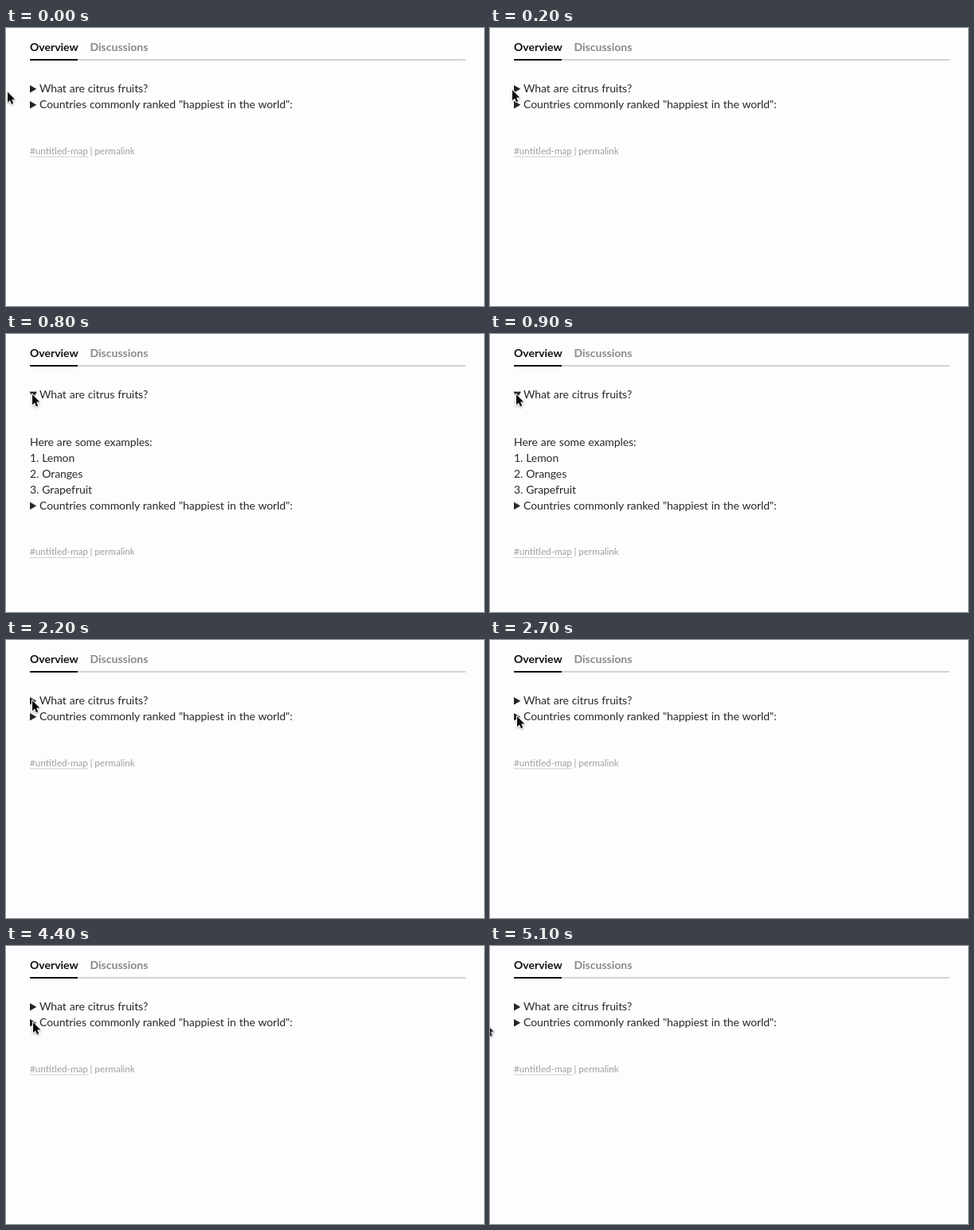
These frames come from a looping animation (600 px wide and 350 px high, 5.2 s). An HTML page:

```html
<!DOCTYPE html>
<html lang="en">
<head>
<meta charset="utf-8">
<title>Collapsible notes</title>
<style>
  html, body { margin: 0; width: 100%; height: 100%; overflow: hidden; background: #fdfcfe; }
  svg { display: block; width: 600px; height: 350px; }
  text { font: 400 14px Lato, "Open Sans", sans-serif; fill: #29282a; word-spacing: .5px; letter-spacing: -.08px; }
  .tab { font-weight: 700; letter-spacing: 0; fill: #111012; }
  .tab.idle { fill: #89888a; }
  .foot text { font-size: 11.7px; letter-spacing: 0; fill: #a09fa1; }
  .mark { fill: #252426; transform-box: view-box; }
  #mark1 { transform-origin: 34.2px 76.8px; }
  #mark2 { transform-origin: 34.2px 96.8px; }

  .step { animation: 5200ms step-end infinite; }
  #list1 { animation-name: show1; }
  #list2 { animation-name: show2; }
  #mark1 { animation-name: turn1; }
  #mark2 { animation-name: turn2; }
  #second { animation-name: push1; }
  #foot { animation-name: push2; }
  #cursor { animation-name: point; filter: drop-shadow(0 1px 1px rgba(0, 0, 0, .3)); }

  /* first item open 800-2200 ms, second item open 3200-4400 ms */
  @keyframes show1 { 0%, 42.3% { visibility: hidden; } 15.38% { visibility: visible; } 100% { visibility: hidden; } }
  @keyframes show2 { 0%, 84.61% { visibility: hidden; } 61.53% { visibility: visible; } 100% { visibility: hidden; } }
  @keyframes turn1 { 0%, 42.3%, 100% { transform: rotate(0deg); } 15.38% { transform: rotate(90deg); } }
  @keyframes turn2 { 0%, 84.61%, 100% { transform: rotate(0deg); } 61.53% { transform: rotate(90deg); } }
  @keyframes push1 { 0%, 42.3%, 100% { transform: translateY(0); } 15.38% { transform: translateY(119.6px); } }
  @keyframes push2 {
    0%, 42.3%, 84.61%, 100% { transform: translateY(0); }
    15.38% { transform: translateY(119.6px); }
    61.53% { transform: translateY(99.7px); }
  }
  @keyframes point {
    0% { transform: translate(2px, 80.5px); }
    1.92% { transform: translate(14px, 79px); }
    3.84% { transform: translate(28px, 78px); }
    5.76% { transform: translate(33px, 77.5px); }
    9.61% { transform: translate(33px, 76.5px); }
    11.53% { transform: translate(33px, 76px); }
    46.15% { transform: translate(33px, 79px); }
    48.07% { transform: translate(33.4px, 87px); }
    50% { transform: translate(34px, 94px); }
    51.92% { transform: translate(34px, 96px); }
    94.23% { transform: translate(25px, 97px); }
    96.15% { transform: translate(8px, 98px); }
    98.07%, 100% { transform: translate(-4.5px, 98.5px); }
  }
</style>
</head>
<body>
<svg viewBox="0 0 600 350">
  <text class="tab" x="30" y="28.5">Overview</text>
  <text class="tab idle" x="105.5" y="28.5">Discussions</text>
  <rect x="30" y="39" width="547" height="2" fill="#d3d2d4"/>
  <rect x="30" y="39" width="60" height="2" fill="#0d0c0e"/>

  <path id="mark1" class="mark step" d="M30 72.1 L38.3 76.8 L30 81.5Z"/>
  <text x="42" y="81.4">What are citrus fruits?</text>
  <g id="list1" class="step">
    <text x="30" y="141.2">Here are some examples:</text>
    <text x="30" y="161.1">1. Lemon</text>
    <text x="30" y="181.1">2. Oranges</text>
    <text x="30" y="201">3. Grapefruit</text>
  </g>

  <g id="second" class="step">
    <path id="mark2" class="mark step" d="M30 92.1 L38.3 96.8 L30 101.5Z"/>
    <text x="42" y="101.4">Countries commonly ranked "happiest in the world":</text>
  </g>
  <g id="list2" class="step">
    <text x="30" y="161.1">- Denmark</text>
    <text x="30" y="181.1">- Costa Rica</text>
    <text x="30" y="201">- Australia</text>
  </g>

  <g id="foot" class="foot step">
    <text x="30" y="158.7">#untitled-map</text>
    <path d="M30 162 H103" stroke="#a09fa1" stroke-dasharray="1 1"/>
    <text x="105.5" y="158.7">|</text>
    <text x="111.3" y="158.7">permalink</text>
  </g>

  <g id="cursor" class="step">
    <path d="M0 0 V13.2 L3 10.4 L5 15.2 L7.2 14.2 L5.2 9.6 H9.3Z"
      fill="#0a090b" stroke="#fff" stroke-width="2" stroke-linejoin="round" paint-order="stroke"/>
  </g>
</svg>
</body>
</html>
```
